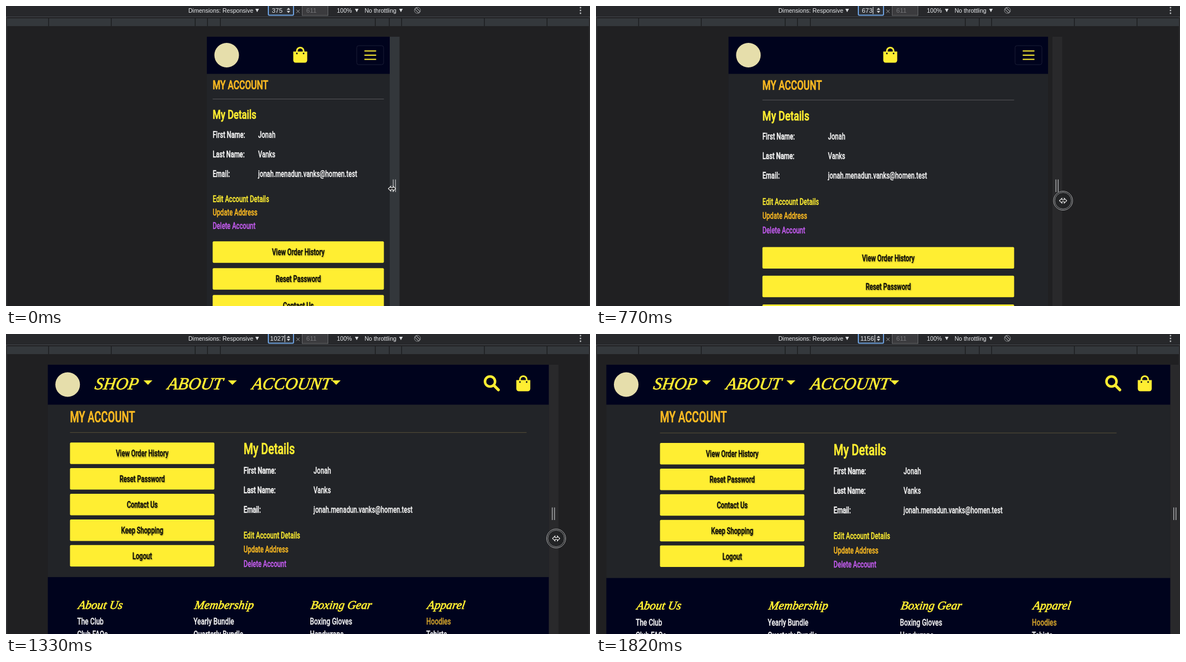
An HTML page for the animation above (2.73 s loop, 1044x537 px).

```html
<!DOCTYPE html>
<html lang="en">
<head>
<meta charset="utf-8">
<title>Responsive account page</title>
<style>
  html, body { margin: 0; width: 100%; height: 100%; overflow: hidden; background: #202022; }
  svg { display: block; width: 100%; height: 100%; }
  .ui { font: 10.55px "Liberation Sans", Arial, sans-serif; fill: #e8eaed; }
  .num { font-size: 11.5px; }
  .body, .foot, .head { font-family: Roboto, "Open Sans", sans-serif; font-weight: 500; stroke-width: .35px; }
  .body { font-size: 16px; }
  .foot { font-size: 17px; }
  .head { stroke-width: .7px; }
  .label { stroke-width: .6px; }
  .btn { text-shadow: 1px 1px 2px rgba(0, 0, 0, .35); }
  .script { font-family: "Liberation Serif", "Noto Serif", serif; font-style: italic; fill: #ffee32; stroke: #ffee32; stroke-width: .8px; }
</style>
</head>
<body>
<svg id="stage" viewBox="0 0 1044 537" preserveAspectRatio="none">
  <g id="tools"></g>
  <g id="view"></g>
</svg>
<script>
const LOOP = 2730, STEP = 70, END = 1820;
const K = 0.872, MID = 522.5;
const YELLOW = '#ffee32', AMBER = '#fdbb22', NAVY = '#00031d', WHITE = '#f4f4f4';

// time, typed width, page width, pointer x, pointer y
const KEYS = [
  [0, 375, 375, 690, 327],
  [350, 375, 375, 690, 327],
  [420, 375, 375, 694, 327],
  [490, 377, 377, 701, 326.5],
  [770, 673, 655, 835, 348.5],
  [910, 743, 735, 853.5, 351.5],
  [1120, 881, 881, 918, 359],
  [1330, 1027, 1027, 983.5, 366],
  [1470, 1093, 1091, 1005.5, 368.5],
  [1610, 1109, 1109, 1014, 369.5],
  [1820, 1156, 1156, 1035, 371]
];

const BUTTONS = ['View Order History', 'Reset Password', 'Contact Us', 'Keep Shopping', 'Logout'];
const DETAILS = [['First Name:', 'Jonah'], ['Last Name:', 'Vanks'], ['Email:', 'jonah.menadun.vanks@homen.test']];
const LINKS = [['Edit Account Details', YELLOW], ['Update Address', AMBER], ['Delete Account', '#c45cf0']];
const FOOTER = [
  ['About Us', 'The Club', 'Club FAQs'],
  ['Membership', 'Yearly Bundle', 'Quarterly Bundle'],
  ['Boxing Gear', 'Boxing Gloves', 'Handwraps'],
  ['Apparel', 'Hoodies', 'Tshirts']
];

const rect = (x, y, w, h, fill, more = '') =>
  `<rect x="${x}" y="${y}" width="${w}" height="${h}" fill="${fill}" ${more}/>`;
const path = (d, stroke, width, more = '') =>
  `<path d="${d}" fill="none" stroke="${stroke}" stroke-width="${width}" ${more}/>`;
const shape = (d, fill) => `<path d="${d}" fill="${fill}"/>`;
const circle = (x, y, r, more) => `<circle cx="${x}" cy="${y}" r="${r}" ${more}/>`;
const text = (x, y, s, cls, more = '') => `<text x="${x}" y="${y}" class="${cls}" ${more}>${s}</text>`;
// condensed lettering
const slim = (x, y, s, cls, fill, more = '', sx = 0.7) =>
  `<text transform="translate(${x} ${y}) scale(${sx} 1)" class="${cls}" fill="${fill}" stroke="${fill}" ${more}>${s}</text>`;
// slanted lettering
const script = (x, y, s, size) =>
  `<text transform="translate(${x} ${y}) skewX(-9)" class="script" font-size="${size}">${s}</text>`;
const down = (x, y, w, h, fill) => shape(`M${x - w / 2} ${y}h${w}l${-w / 2} ${h}z`, fill);
const middle = 'text-anchor="middle"';

function sample(t) {
  let i = 1;
  while (i < KEYS.length - 1 && KEYS[i][0] < t) i++;
  const a = KEYS[i - 1], b = KEYS[i];
  const p = Math.min(1, (t - a[0]) / (b[0] - a[0]));
  return a.map((v, n) => v + (b[n] - v) * p);
}

function toolbar() {
  let s = rect(0, 0, 1044, 537, '#202022') + rect(0, 0, 1044, 19, '#27282b');
  s += rect(0, 19, 1044, 1, '#46494d') + rect(2, 22, 1040, 14, '#34383c');
  for (const x of [76, 188, 338, 360, 383, 660, 685, 707, 855, 967]) s += rect(x - 0.5, 22, 1.5, 14, '#1d1e20');
  s += rect(0.5, 20, 1, 517, '#434447') + rect(1042.5, 20, 1, 517, '#38393b');
  s += text(326, 11.5, 'Dimensions: Responsive', 'ui') + text(591.5, 11.5, '100%', 'ui') + text(641, 11.5, 'No throttling', 'ui');
  for (const x of [449, 627, 706]) s += down(x, 5, 6.5, 6, '#dfe1e4');
  s += rect(469, -2, 45, 18.5, '#2d3035', 'rx="2" stroke="#6c9fdc" stroke-width="2"');
  s += down(505, 8.8, 6.4, 3.6, '#d5d7da') + shape('M501.8 6.8h6.4l-3.2-3.6z', '#d5d7da');
  s += path('M519 6.5l6 6m0-6l-6 6', '#a5a7aa', 1);
  s += rect(529.5, -2, 46, 19, '#3b3b3e', 'stroke="#67686b"');
  s += text(546, 12, '611', 'ui num', middle + ' style="fill:#77787b"');
  s += circle(735.5, 7.8, 5.4, 'fill="none" stroke="#8f9194"');
  s += rect(-1.8, -5, 3.6, 10, '#27282b', 'rx="1" transform="translate(735.5 7.8) rotate(-45)" stroke="#a9abae"');
  for (const y of [3, 8, 13]) s += circle(1027, y, 1.4, 'fill="#b4b6b9"');
  return s;
}

function bag(x, y) {
  return path(`M${x - 6} ${y + 10}v-3a6 5.5 0 0 1 12 0v3`, YELLOW, 3) +
    shape(`M${x - 12.5} ${y + 8.5}h25v15.5a4.5 4.5 0 0 1-4.5 4.5h-16a4.5 4.5 0 0 1-4.5-4.5z`, YELLOW) +
    circle(x - 6, y + 12, 1.4, `fill="${NAVY}"`) + circle(x + 6, y + 12, 1.4, `fill="${NAVY}"`);
}

function header(L, R, wide) {
  let s = rect(L, 55, R - L, wide ? 71.5 : 66.5, NAVY);
  s += circle(L + 35.5, wide ? 90.5 : 88, 22, 'fill="#e6deab"');
  if (!wide) {
    s += bag(526, 73) + rect(R - 59, 71, 48, 34, 'none', 'rx="3.5" stroke="#1b1e36"');
    for (const y of [80.5, 88, 95.5]) s += rect(R - 45.3, y - 1, 21, 2, YELLOW);
    return s;
  }
  [['SHOP', 83, 179], ['ABOUT', 213, 330], ['ACCOUNT', 364, 515.5]].forEach(([name, x, arrow]) => {
    s += script(L + x, 99, name, 30.5) + down(L + arrow, 83, 16, 8, YELLOW);
  });
  const x = R - 102;
  s += circle(x - 3, 85, 9, `fill="none" stroke="${YELLOW}" stroke-width="4.5"`);
  s += path(`M${x + 4} 92l8 8`, YELLOW, 5.2, 'stroke-linecap="round"');
  return s + bag(R - 45.5, 74);
}

function buttons(x, y, w, step) {
  return BUTTONS.map((name, i) => {
    const top = y + i * step;
    return rect(x, top, w, 38.5, YELLOW, 'rx="2"') +
      slim(x + w / 2, top + 25.2, name, 'body btn', '#08080a', middle);
  }).join('');
}

function footer(L, R, y) {
  const first = L + 52.5, gap = (543.2 - first) / 2;
  let s = rect(L, y, R - L, 537 - y, NAVY);
  FOOTER.forEach(([title, ...items], i) => {
    const x = first + i * gap;
    s += script(x + 1, y + 56.5, title, 21.2);
    items.forEach((item, n) => {
      s += slim(x, y + 85.3 + n * 22.5, item, 'foot', item === 'Hoodies' ? '#d3a32c' : WHITE);
    });
  });
  return s;
}

function page(w) {
  const half = w * K / 2, L = MID - half, R = MID + half;
  const wide = w >= 992, split = w >= 768, sm = w >= 576;
  const box = (wide ? 960 : split ? 720 : sm ? 540 : w) * K;
  const left = MID - box / 2, x = left + 12 * K, inner = box - 24 * K;
  const h = (20.8 + 0.006 * w) * K, size = h * 1.14;
  const top = wide ? 133.9 : 128.2;
  const rule = top + 1.2 * h + 14.2;
  const headTop = rule + 15.1;
  const row = headTop + 1.2 * h + 24.4;
  const linkStep = wide ? 25.6 : split ? 24.4 : sm ? 25.2 : 24;
  const link = row + (wide ? 116 : split ? 114.5 : sm ? 117 : 115);
  const dx = split ? left + box / 3 + 48 * K : x;
  const valueX = dx + (wide ? 125 : split ? 88 : box / 4 - 0.5);
  const last = link + 2 * linkStep;

  let s = rect(L, 55, R - L, 482, '#222428') + header(L, R, wide);
  s += slim(x, top + 0.6 * h + 0.36 * size, 'MY ACCOUNT', 'head', AMBER, `font-size="${size}"`, 0.685);
  s += rect(x, rule - 0.5, inner, 1, split ? '#584f38' : '#56575a');
  s += slim(dx, headTop + 0.6 * h + 0.36 * size, 'My Details', 'head', YELLOW, `font-size="${size}"`, 0.725);
  DETAILS.forEach(([name, value], i) => {
    const y = row + i * 35 + 5.6;
    s += slim(dx, y, name, 'body label', WHITE) + slim(valueX, y, value, 'body', WHITE);
  });
  LINKS.forEach(([name, color], i) => {
    s += slim(dx, link + i * linkStep + 5.6, name, 'body', color);
  });
  s += split
    ? buttons(x, rule + 17.9, box / 3 - 24 * K, wide ? 45.9 : 43.8)
    : buttons(x, last + (sm ? 30.5 : 28), inner, sm ? 51.3 : 48);
  if (split) s += footer(L, R, last + 23.9);
  return s;
}

function pointer(x, y, pressed) {
  const arrows = `M${x - 6.5} ${y}l4.5-4.5v3h4v-3l4.5 4.5l-4.5 4.5v-3h-4v3z`;
  let s = '';
  if (pressed) {
    s += circle(x, y, 17, 'fill="#222325" fill-opacity=".75" stroke="#a9aaac"');
    s += circle(x, y, 14.8, 'fill="none" stroke="#8b8c8e"');
  }
  return s + `<path d="${arrows}" fill="#111" stroke="#f2f2f2" stroke-width="1.1"/>`;
}

function scene(t) {
  const [, typed, w, px, py] = sample(t);
  const label = Math.round(typed), edge = MID + label * K / 2;
  let s = text(484.8, 12, label, 'ui num', middle);
  if (t >= 420) s += rect(label > 999 ? 498 : 494.8, 1.5, 1, 13, '#e8eaed');
  s += rect(edge, 55, 17.5, 482, t < 560 ? '#33373b' : '#29292b');
  s += page(w);
  const grip = `M${edge + 6.3} 310.5v22.500m4 0v-22.5`;
  const dragging = t >= 280 && t < END;
  if (dragging) s += pointer(px, py, true);
  s += path(grip, '#a6a7a9', 1.5);
  if (t < 280) s += pointer(px, py, false);
  return s;
}

const view = document.getElementById('view');
document.getElementById('tools').innerHTML = toolbar();
const start = performance.now();
let shown = -1;

function draw(now) {
  const t = Math.max(0, now - start) % LOOP;
  const tick = Math.min(END, Math.floor(t / STEP + 0.001) * STEP);
  if (tick !== shown) {
    shown = tick;
    view.innerHTML = scene(tick);
  }
  requestAnimationFrame(draw);
}
draw(start);
</script>
</body>
</html>
```
